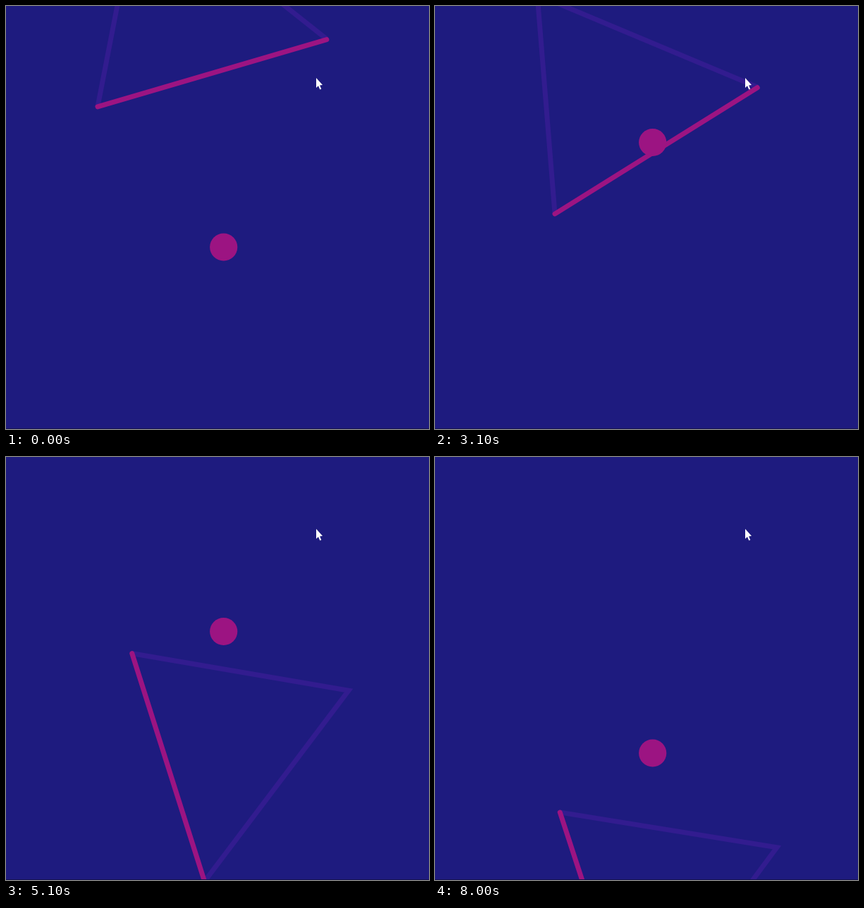
An HTML page with a canvas for the animation above (8100 ms loop, 600 by 600 pixels).

```html
<!DOCTYPE html>
<html lang="en">
<head>
<meta charset="utf-8">
<title>Bouncing ball and turning triangle</title>
<style>
html, body { margin: 0; width: 100%; height: 100%; overflow: hidden; background: #1e1b7f; }
canvas { display: block; width: 600px; height: 600px; }
</style>
</head>
<body>
<canvas id="stage" width="600" height="600"></canvas>
<script>
const ctx = document.getElementById("stage").getContext("2d");
const LOOP = 8100, STEP = 100;
const GRAVITY = 700, TAP_GAP = .6;
const BACK = "#1e1b7f", PINK = "#9c1482", FAINT = "#321c8f";
const CENTER_X = 307.4, HALF_HEIGHT = 150.35, HALF_BASE = 155.5, OUTSET = .7;

// Key points: seconds, triangle angle (degrees), triangle y, ball height above the triangle
const ANGLE = 1, SCROLL = 2, RISE = 3;
const keys = [
  [0, 191, 18.2, -323.8],
  [1.8, -26.9, 17.3, -246.7],
  [3.1, -184.6, 127.1, -66.4],
  [3.6, -245.4, 240.5, -20],
  [3.9, -281.85, 253.1, 1.1],
  [5.1, -440.3, 453.2, 205.7],
  [6.8, -648.25, 600.8, 350.3],
  [7.2, -699, 654, 399],
  [8, -800.8, 677.4, 257.4]
];

function slope(i, col) {
  const [a, b] = [keys[i - 1], keys[i]];
  return (b[col] - a[col]) / (b[0] - a[0]);
}

// Tangent that never overshoots its neighbours
function tangent(i, col) {
  const before = slope(Math.max(i, 1), col);
  const after = slope(Math.min(i + 1, keys.length - 1), col);
  return before * after > 0 ? 2 * before * after / (before + after) : 0;
}

function smooth(i, t, col) {
  const [a, b] = [keys[i - 1], keys[i]];
  const span = b[0] - a[0], u = (t - a[0]) / span, v = 1 - u;
  return a[col] * v * v * (1 + 2 * u) + b[col] * u * u * (1 + 2 * v)
    + span * u * v * (tangent(i - 1, col) * v - tangent(i, col) * u);
}

// Even hops along a straight line from key to key
function hop(i, t) {
  const [a, b] = [keys[i - 1], keys[i]];
  const span = b[0] - a[0], s = t - a[0];
  const gap = span / Math.max(1, Math.round(span / TAP_GAP)), phase = s % gap;
  return a[RISE] + slope(i, RISE) * s + GRAVITY / 2 * phase * (gap - phase);
}

function trace(points) {
  ctx.beginPath();
  points.forEach(p => ctx.lineTo(...p));
}

function line(points, color, cap) {
  trace(points);
  ctx.strokeStyle = color;
  ctx.lineWidth = 7;
  ctx.lineCap = cap;
  ctx.stroke();
}

function drawCursor() {
  trace([[440, 102], [440, 116], [443, 113.3], [445.3, 118.6], [447.3, 117.7], [445.1, 112.5], [449, 112]]);
  ctx.fillStyle = "#fff";
  ctx.fill();
}

function draw(t) {
  const i = Math.max(1, keys.findIndex(k => k[0] >= t));
  const angle = smooth(i, t, ANGLE) * Math.PI / 180, pivotY = smooth(i, t, SCROLL);
  const cos = Math.cos(angle), sin = Math.sin(angle);
  const place = (x, y) => [CENTER_X + x * cos - y * sin, pivotY + x * sin + y * cos];

  ctx.fillStyle = BACK;
  ctx.fillRect(0, 0, 600, 600);
  line([place(-HALF_HEIGHT, 0), place(HALF_HEIGHT, HALF_BASE), place(HALF_HEIGHT, -HALF_BASE)], FAINT, "butt");
  line([place(-HALF_HEIGHT, -OUTSET), place(HALF_HEIGHT, -HALF_BASE - OUTSET)], PINK, "round");

  ctx.beginPath();
  ctx.arc(308.7, pivotY - hop(i, t), 19.6, 0, 7);
  ctx.fillStyle = PINK;
  ctx.fill();

  drawCursor();
  ctx.fillStyle = "#151350";
  ctx.fillRect(0, 599, 600, 1);
}

function tick() {
  draw(Math.floor(performance.now() % LOOP / STEP) * STEP / 1000);
  requestAnimationFrame(tick);
}
tick();
</script>
</body>
</html>
```
